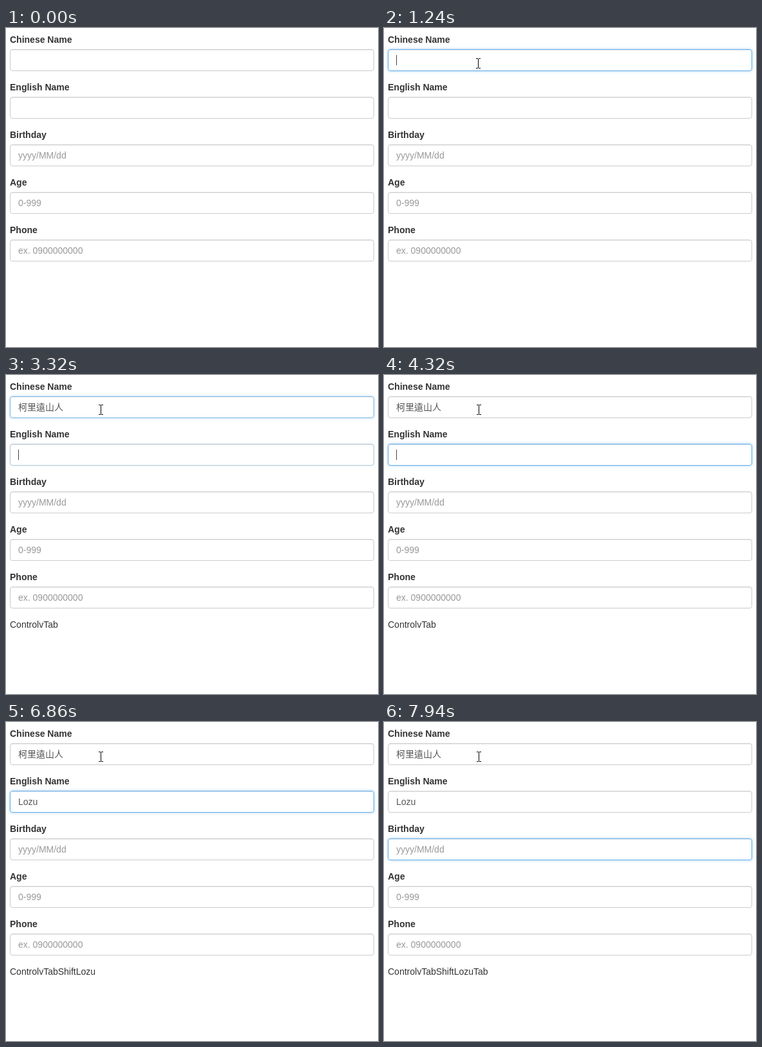
Recreate the animation shown at these times as an HTML page. Size 578 by 496 pixels, loop 8000 ms.

```html
<!DOCTYPE html>
<html lang="en">
<head>
<meta charset="utf-8">
<style>
html, body { margin: 0; width: 100%; height: 100%; overflow: hidden; background: #fff; }
body { position: relative; font: 14px/20px "Liberation Sans", Arial, "Noto Sans CJK TC", "Noto Sans CJK", sans-serif; color: #333; }
label, .field, #log, svg { position: absolute; white-space: pre; }
label { left: 6px; font-weight: bold; }
.field {
  left: 6px; width: 566px; height: 34px; padding: 6px 12px;
  box-sizing: border-box; border: 1px solid #ccc; border-radius: 4px; color: #555;
}
.field:first-of-type { font-weight: 300; }
.empty { color: #999; }
.caret { position: absolute; width: 1px; height: 16px; background: #444; }
#log { left: 6px; top: 378px; }
svg { left: 0; top: 0; width: 14px; height: 20px; overflow: visible; }
</style>
</head>
<body>
<div id="log"></div>
<svg shape-rendering="crispEdges">
  <path id="arrow" d="M.5 .5V16.5L4.5 12.5L7 18.5L9 17.5L6.5 11.5H11.5Z" fill="#fff" stroke="#000"/>
  <path id="beam" d="M-3-8h3v1h1v-1h3v1h-3v14h3v1h-3v-1h-1v1h-3v-1h3v-14h-3z"/>
</svg>
<script>
const LOOP = 8000;
const labels = ["Chinese Name", "English Name", "Birthday", "Age", "Phone"];
const hints = ["", "", "yyyy/MM/dd", "0-999", "ex. 0900000000"];
const zhName = "柯里遠山人";
const enName = [[4700, "L"], [5320, "o"], [5780, "z"], [6390, "u"]];
const keys = [[1610, "Control"], [1990, "v"], [3320, "Tab"], [4470, "Shift"], ...enName, [7390, "Tab"]];
const focusTimes = [1070, 3320, 7390];
const blinks = [1070, 2540, 3000, 3780, 4320, 5240, 5320, 6320, 6390, 6860, 7390, 7940];

const $ = id => document.getElementById(id);
const pointer = document.querySelector("svg");
const log = $("log");

const add = (tag, top, text = "") => {
  const el = document.createElement(tag);
  el.style.top = top + "px";
  el.textContent = text;
  document.body.insertBefore(el, log);
  return el;
};
const fields = labels.map((text, i) => {
  add("label", 8 + 74 * i, text);
  const box = add("section", 33 + 74 * i);
  box.className = "field";
  return box;
});
const caret = document.createElement("span");
caret.className = "caret";

const typed = (list, t) => list.filter(([at]) => t >= at).map(([, s]) => s).join("");
const mix = (a, b, p) => Math.round(a + (b - a) * p);

// The border and glow reach full strength in three visible steps.
const fade = (t, at) => t < at ? 0 : [.25, .92, 1][Math.min(2, Math.floor((t - at) / 85))];

function drawField(box, i, t) {
  const value = i === 0 ? (t >= 1990 ? zhName : "") : i === 1 ? typed(enName, t) : "";
  box.textContent = value || hints[i];
  box.classList.toggle("empty", !value);

  const on = i < 3 ? fade(t, focusTimes[i]) : 0;
  const off = i < 2 ? fade(t, focusTimes[i + 1]) : 0;
  const p = on - off;
  box.style.borderColor = `rgb(${mix(204, 102, p)},${mix(204, 175, p)},${mix(204, 233, p)})`;
  box.style.boxShadow =
    `inset 0 1px 1px rgba(0,0,0,.075), 0 0 4px rgba(102,175,233,${.6 * p})`;
}

function drawCaret(t) {
  if (blinks.filter(at => t >= at).length % 2 === 0) return;
  const i = focusTimes.filter(at => t >= at).length - 1;
  const hasZh = i === 0 && t >= 1990;
  caret.style.top = (hasZh ? 7 : 8) + "px";
  caret.style.left = i === 2 ? "12px" : "auto";
  fields[i].append(caret);
}

function drawPointer(t) {
  pointer.style.display = t < 530 ? "none" : "block";
  const step = Math.min(1, Math.floor((t - 530) / 78) / 5);
  const p = 1 - (1 - step) ** 2;
  const nudge = t >= 1320 ? 1 : 0;
  const x = mix(505, 146, p) + nudge;
  const y = mix(83, 55, p) - nudge;
  pointer.style.transform = `translate(${x}px,${y}px)`;
  $("arrow").style.display = y > 67 ? "" : "none";
  $("beam").style.display = y > 67 ? "none" : "";
}

function draw(t) {
  fields.forEach((box, i) => drawField(box, i, t));
  drawCaret(t);
  drawPointer(t);
  log.textContent = typed(keys, t);
}

const start = performance.now();
function tick() {
  draw((performance.now() - start) % LOOP);
  requestAnimationFrame(tick);
}
tick();
</script>
</body>
</html>
```
